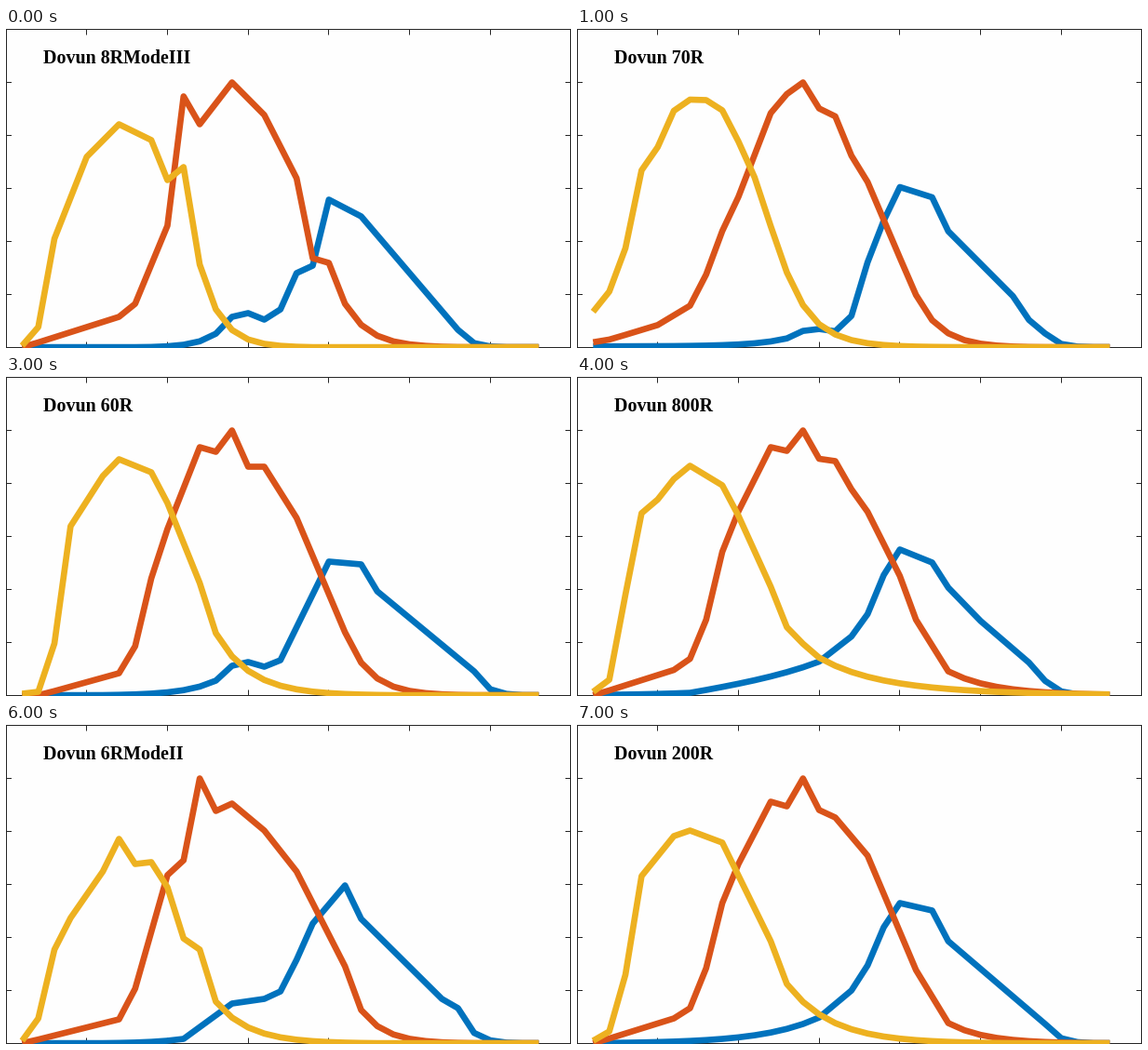
Animation, 607 px wide and 344 px high, one loop 8000 ms. Source, as a matplotlib script:

```python
import numpy as np
import matplotlib.pyplot as plt
from matplotlib.animation import FuncAnimation

W, H, DPI = 607, 344, 100
TOP, BASE = 1.5, 343.5           # frame lines; BASE is also the zero line
PEAK = 285                       # full-scale height in px
PX = 72 / DPI                    # points per pixel
STEPS = 35                       # sample spacings across the stage
SAMPLES = np.arange(33)
COLORS = ["#0072BD", "#D95319", "#EDB120"]


def curve(knots, fall, rise=0.6):
    """Straight runs between key points, geometric decay on both flanks."""
    at, heights = list(knots), list(knots.values())
    y = np.interp(SAMPLES, at, heights)
    y *= rise ** np.maximum(at[0] - SAMPLES, 0)
    y *= fall ** np.maximum(SAMPLES - at[-1], 0.0)
    return np.maximum(y, 0.4)


def blend(a, b):
    """Average two sensors and rescale the highest response to full scale."""
    mix = np.add(a, b)
    return mix * PEAK / mix.max()


# Each sensor: red, green and blue response as {sample: height in px}.
mode3 = [
    curve({13: 33, 14: 37, 15: 30, 16: 41, 17: 80, 18: 88, 19: 159, 21: 141,
           27: 19}, 0.25, 0.45),
    curve({0: 0, 6: 33, 7: 47, 9: 131, 10: 270, 11: 240, 13: 285, 15: 250,
           17: 182, 18: 96, 19: 91, 20: 47}, 0.52),
    curve({0: 2, 1: 22, 2: 117, 4: 205, 6: 240, 8: 223, 9: 180, 10: 194},
          0.46),
]
r900 = [
    curve({0: 2, 15: 4, 16: 30, 17: 110, 18: 164, 19: 201, 21: 182, 22: 138,
           26: 56, 27: 19}, 0.22),
    curve({0: 11, 4: 34, 6: 66, 7: 104, 9: 145, 12: 283, 13: 285, 15: 251,
           16: 194, 17: 165, 19: 84, 20: 45}, 0.52),
    curve({0: 75, 3: 199, 4: 222, 5: 273, 7: 285, 8: 270, 10: 202, 11: 140,
           13: 49}, 0.48),
]
r60 = [
    curve({12: 16, 13: 32, 14: 36, 15: 31, 16: 38, 19: 144, 21: 141, 22: 112,
           28: 26}, 0.26),
    curve({1: 0, 6: 24, 7: 53, 8: 126, 9: 179, 11: 267, 12: 262, 13: 285,
           14: 246, 15: 246, 17: 191, 20: 68}, 0.52),
    curve({0: 2, 1: 4, 2: 56, 3: 182, 5: 236, 6: 254, 8: 240, 9: 207,
           11: 121, 12: 67}, 0.63),
]
r90 = [
    curve({6: 3, 14: 45, 16: 70, 17: 91, 18: 134, 19: 163, 21: 143, 24: 80,
           27: 35}, 0.3, 0.8),
    curve({0: 0, 5: 28, 6: 41, 7: 82, 8: 158, 9: 203, 11: 274, 12: 271,
           13: 285, 14: 258, 15: 261, 16: 221, 19: 137, 20: 84, 22: 30}, 0.75),
    curve({0: 5, 1: 21, 2: 143, 3: 212, 4: 220, 6: 265, 8: 236, 9: 206,
           12: 83, 14: 50}, 0.84),
]
mode2 = [
    curve({10: 5, 13: 43, 15: 48, 16: 56, 17: 90, 18: 129, 20: 170, 21: 134,
           26: 48, 27: 38}, 0.3),
    curve({0: 0, 6: 26, 7: 59, 9: 181, 10: 197, 11: 285, 12: 250, 13: 258,
           15: 229, 17: 185, 20: 83, 21: 36}, 0.52),
    curve({0: 3, 1: 27, 2: 101, 3: 135, 5: 185, 6: 220, 7: 193, 8: 195,
           9: 168, 10: 113, 11: 101, 12: 45}, 0.62),
]
r200 = [
    curve({14: 28, 16: 57, 17: 84, 18: 125, 19: 151, 21: 143, 22: 110,
           28: 21}, 0.27, 0.75),
    curve({0: 0, 5: 27, 6: 38, 7: 81, 8: 151, 9: 193, 11: 260, 12: 255,
           13: 285, 14: 251, 15: 243, 17: 202, 20: 79, 22: 22}, 0.65),
    curve({0: 3, 1: 13, 2: 74, 3: 180, 5: 223, 6: 229, 8: 216, 11: 110,
           12: 64}, 0.7),
]

SLIDES = [
    ("8RModeIII", mode3),
    ("70R", blend(r900, r60)),
    ("900R", r900),
    ("60R", r60),
    ("800R", blend(r90, r200)),
    ("90R", r90),
    ("6RModeII", mode2),
    ("200R", r200),
]

fig = plt.figure(figsize=(W / DPI, H / DPI), dpi=DPI, facecolor="#FEFEFE")
ax = fig.add_axes([0, 0, 1, 1])
ax.set_xlim(0, W)
ax.set_ylim(H, 0)
ax.axis("off")


def rule(xs, ys):
    # Snapping would move lines at pixel centres to the next pixel.
    ax.plot(xs, ys, color="#262626", lw=PX, solid_capstyle="butt",
            snap=False, zorder=1)


for y in (TOP, BASE):
    rule([0, W], [y, y])
for x in (0.5, W - 0.5):
    rule([x, x], [TOP, BASE])

TICK = 6
for k in range(1, 7):
    x = W * k // 7 + 0.5
    rule([x, x], [TOP, TOP + TICK])
    rule([x, x], [BASE - TICK, BASE])
for y in np.linspace(TOP, BASE, 7)[1:-1]:
    rule([0, TICK], [y, y])
    rule([W - TICK, W], [y, y])

xs = W / STEPS * (SAMPLES + 1)
lines = [ax.plot(xs, xs * 0 + BASE, color=c, lw=6.67 * PX, zorder=2 + k,
                 solid_capstyle="butt", solid_joinstyle="round")[0]
         for k, c in enumerate(COLORS)]
title = ax.text(39.5, 38, "", family="Liberation Serif", weight="bold",
                size=20 * PX, color="black", va="baseline", zorder=6)


def draw(i):
    model, curves = SLIDES[i]
    title.set_text("Dovun " + model)
    for line, heights in zip(lines, curves):
        line.set_ydata(BASE - heights)
    return lines + [title]


anim = FuncAnimation(fig, draw, frames=len(SLIDES), interval=1000,
                     repeat=True, repeat_delay=0, blit=False)
plt.show()
```
